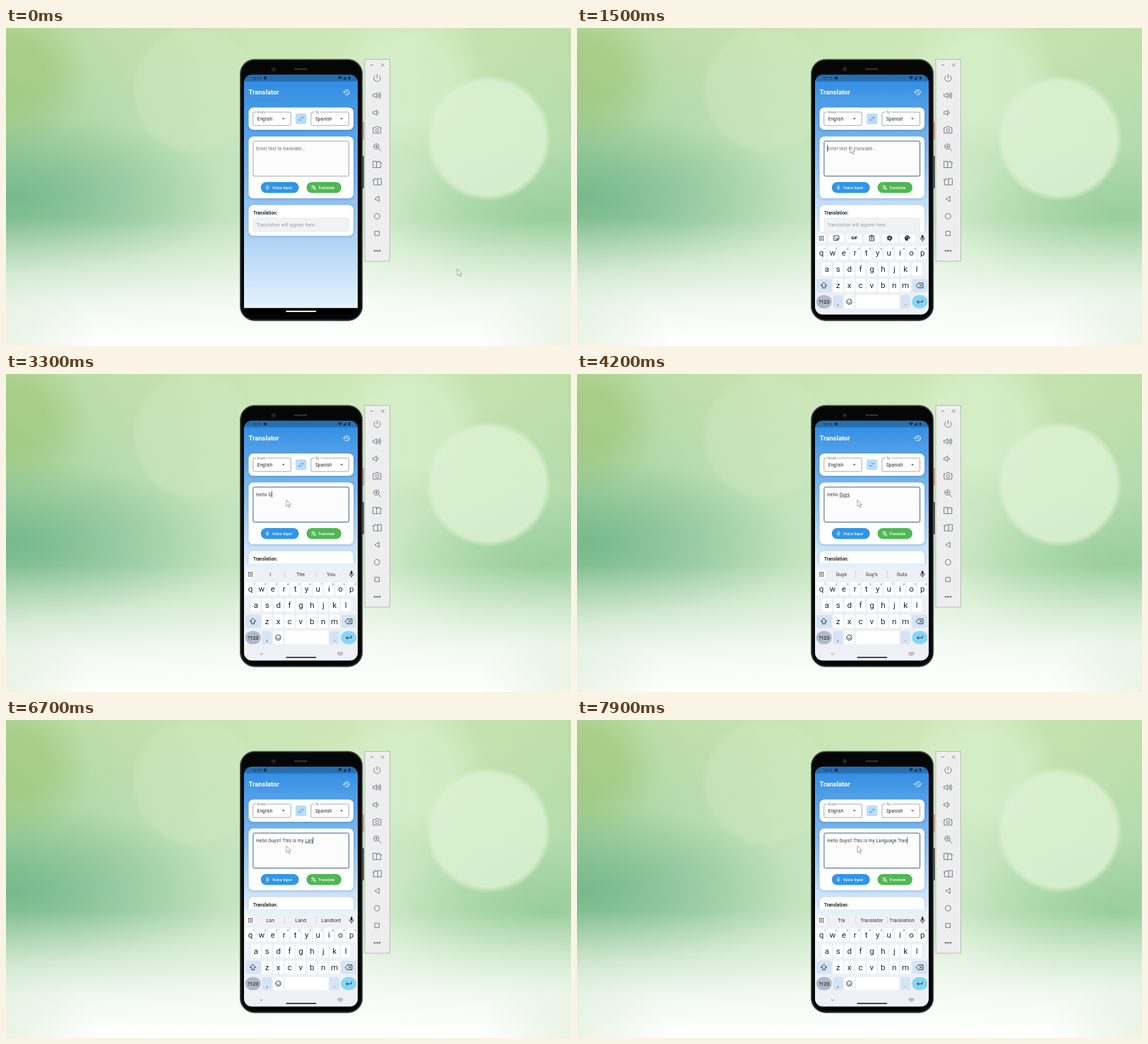
These frames come from a looping animation (800x450 px, 8 s). An HTML page:

```html
<!DOCTYPE html>
<html lang="en">
<head>
<meta charset="utf-8">
<title>Translator demo</title>
<style>
html, body { margin: 0; width: 100%; height: 100%; overflow: hidden; }
body {
  background:
    radial-gradient(ellipse 130px 90px at 0 440px, rgba(205,228,192,.4), transparent),
    radial-gradient(ellipse 130px 90px at 800px 440px, rgba(205,228,192,.4), transparent),
    linear-gradient(transparent 60%, rgba(255,255,255,.42) 73%, rgba(255,255,255,.8) 86%, #fdfefd 97%),
    radial-gradient(circle 89px at 683px 156px, rgba(220,241,210,.85) 90%, transparent),
    radial-gradient(circle 110px at 575px 72px, rgba(222,243,213,.5) 50%, transparent),
    radial-gradient(circle 105px at 15px 66px, rgba(150,190,100,.4) 40%, transparent),
    radial-gradient(circle 92px at 268px 88px, rgba(210,234,196,.35) 90%, transparent),
    radial-gradient(ellipse 300px 120px at 15px 240px, rgba(92,172,128,.6), transparent),
    radial-gradient(ellipse 230px 105px at 765px 270px, rgba(125,192,135,.5), transparent),
    linear-gradient(rgba(205,229,165,.5), transparent 45%),
    linear-gradient(90deg, #9fce9d, #b2d9b0 20%, #c6e5c0 42%, #d0eaca 64%, #bbe0b5 83%, #b2daae);
}
svg { display: block; width: 800px; height: 450px; }
text { font-family: Roboto, sans-serif; white-space: pre; }
.body { font-size: 6.27px; letter-spacing: .2px; }
.mid { text-anchor: middle; }
.card { fill: #fff; filter: drop-shadow(0 1.5px 2px rgba(10,60,120,.24)); }
.line { fill: none; stroke-linecap: round; stroke-linejoin: round; }
</style>
</head>
<body>
<svg viewBox="0 0 800 450" xmlns="http://www.w3.org/2000/svg">
  <defs>
    <linearGradient id="sky" x1="0" y1="0" x2="0" y2="1">
      <stop stop-color="#2b8ae2"/><stop offset="1" stop-color="#e6f2fd"/>
    </linearGradient>
    <clipPath id="screen"><rect x="337" y="66" width="161" height="339.5" rx="11"/></clipPath>
    <clipPath id="view"><rect id="viewBox" x="337" y="66" width="161" height="331"/></clipPath>
  </defs>

  <g id="phone">
    <rect x="503.500" y="133" width="3" height="25" rx="1" fill="#cf8168"/>
    <rect x="503.500" y="181" width="3" height="46" rx="1" fill="#1b1d1e"/>
    <rect x="331.600" y="44.400" width="173" height="369.800" rx="20.500" fill="#050606" stroke="#5d6264" stroke-width="1.200"/>
    <rect x="333" y="45.800" width="170.200" height="367" rx="19" fill="none" stroke="#232627" stroke-width=".9"/>
    <circle cx="379" cy="58.3" r="3.6" fill="#17191d"/><circle cx="379" cy="58.3" r="1.5" fill="#2c3140"/>
    <rect x="408" y="57" width="19" height="2.6" rx="1.3" fill="#2b2d2f"/>
  </g>

  <g clip-path="url(#screen)">
    <rect id="bg" x="337" y="66" width="161" height="330.5" fill="url(#sky)"/>
    <rect x="337" y="66" width="161" height="9.5" fill="#000" opacity=".22"/>
    <rect x="337" y="396.500" width="161" height="9.500" fill="#000"/>
    <g fill="#12324f">
      <text x="348.5" y="72.8" font-size="5">12:15</text>
      <circle cx="367" cy="70.8" r="2.2"/>
      <path d="M470 69.4q3-2.4 6 0l-3 3.6zM481.500 68.300v4.700h-4.700zM484.800 68.600h2.600v4.400h-2.600z"/>
    </g>
    <text x="343.5" y="94.2" font-size="9.4" font-weight="700" fill="#fff">Translator</text>
    <g class="line" stroke="#fff" stroke-width=".9">
      <path d="M478.900 91a3.700 3.700 0 1 1 1.200 2.700M482.700 89v2.200l1.600 1"/>
      <path d="M477.300 90.400l1.600 1.700 1.700-1.700" fill="#fff" stroke-width=".5"/>
    </g>
    <g clip-path="url(#view)">
      <rect class="card" x="343.500" y="112.500" width="148.500" height="31.500" rx="6.500"/>
      <g id="langs"></g>
      <rect x="410" y="120.800" width="15.500" height="15.300" rx="3.200" fill="#b9ddfa"/>
      <path class="line" stroke="#2f82cf" stroke-width=".65" d="M417 126.900h4m-1-1l1 1-1 1M418.500 130.100h-4m1-1l-1 1 1 1"/>

      <rect class="card" x="343.500" y="153.500" width="148.500" height="87.500" rx="6.500"/>
      <rect id="field" x="349.900" y="160" width="135.700" height="49.600" rx="1.800" fill="#fcfcfd"/>
      <text id="typed" class="body" x="354.300" y="172.700"><tspan id="done"></tspan><tspan id="word"></tspan></text>
      <rect id="caret" y="166" width=".8" height="9" fill="#26384f"/>
      <rect x="360.800" y="218" width="53.800" height="15.600" rx="7.800" fill="#2f95e9"/>
      <rect x="425.500" y="218" width="49.400" height="15.600" rx="7.800" fill="#4fb753"/>
      <g fill="#fff" font-size="5.490" font-weight="500" letter-spacing=".04">
        <text x="377" y="227.700">Voice Input</text>
        <text x="441.900" y="227.700">Translate</text>
      </g>
      <g class="line" stroke="#fff" stroke-width=".65">
        <rect x="369.300" y="222.800" width="1.800" height="3.700" rx=".9"/>
        <path d="M368.100 225.500q0 2.300 2.100 2.300t2.100-2.300M370.200 227.800v1.200"/>
        <path d="M432.300 223.700h4.400M434.500 222.800v.9M436 223.700q-.8 2.500-3.600 4.200M433.300 224.500q.8 1.800 2.500 2.700M435.600 229l1.600-4.200 1.600 4.200M436.200 227.800h2"/>
      </g>

      <rect class="card" x="343.500" y="250.500" width="148.500" height="43.500" rx="6.500"/>
      <text x="349.900" y="263.600" font-size="6.270" font-weight="700" letter-spacing=".08" fill="#25282b">Translation:</text>
      <rect x="349.900" y="269" width="135.700" height="19" rx="2.500" fill="#f1f2f4" stroke="#dcdfe2" stroke-width=".5"/>
      <text class="body" x="354.600" y="280.700" fill="#9b9da0">Translation will appear here...</text>
    </g>
    <rect x="396.300" y="400" width="43" height="1.900" rx=".9" fill="#fff"/>
    <g id="board">
      <rect x="337" y="274" width="161" height="132" fill="#eef0f6"/>
      <g id="tools"></g>
      <g id="tips" font-size="7.100" fill="#33373b" class="mid">
        <path d="M394.500 278v10M439.500 278v10" stroke="#c6cad0" stroke-width=".6"/>
        <text x="374.300" y="285.700"></text><text x="417.200" y="285.700"></text><text x="460.200" y="285.700"></text>
      </g>
      <g id="keys"></g>
    </g>
  </g>

  <g id="panel"></g>
  <path id="mouse" d="M0 0v9.500l2.200-2 1.600 3.300 1.300-.6-1.500-3.300h3z" fill="#fff" fill-opacity=".85" stroke="#7d8184" stroke-width=".7"/>
</svg>
<script>
const $ = id => document.getElementById(id);
const rect = (x, y, w, h, r, fill) =>
  `<rect x="${x}" y="${y}" width="${w}" height="${h}" rx="${r}" fill="${fill}"/>`;
const label = (s, x, y, size, fill = '#24272a', extra = '') =>
  `<text class="mid" x="${x}" y="${y}" font-size="${size}" fill="${fill}" ${extra}>${s}</text>`;
// Icon drawn around 0,0 and moved into place
const icon = (d, x, y, color = '#2b2f33', w = 0.9, fill = 'none') =>
  `<path class="line" transform="translate(${x} ${y})" d="${d}" stroke="${color}" stroke-width="${w}" style="fill:${fill}"/>`;
const ring = (r, x = 0, y = 0) => `M${x - r} ${y}a${r} ${r} 0 1 0 ${2 * r} 0a${r} ${r} 0 1 0 ${-2 * r} 0`;

function langBox(x, name, lang) {
  return `<rect x="${x}" y="119" width="53.600" height="19" rx="2" fill="none" stroke="#777c82" stroke-width=".65"/>` +
    rect(x + 5, 117.5, name.length * 2.6 + 3, 3, 0, '#fff') +
    `<text x="${x + 6}" y="120.700" font-size="4.700" letter-spacing=".15" fill="#60656a">${name}</text>` +
    `<text class="body" x="${x + 6}" y="130.700" fill="#202326">${lang}</text>` +
    `<path d="M${x + 41} 127.400h4.200l-2.100 2.200z" fill="#4b5055"/>`;
}
$('langs').innerHTML = langBox(349.7, 'From', 'English') + langBox(431.9, 'To', 'Spanish');

function keys() {
  const PALE = '#d3e4f5';
  const rows = [['qwertyuiop', 346, 304], ['asdfghjkl', 353.8, 327], ['zxcvbnm', 369.6, 350]];
  let out = '';
  rows.forEach(([letters, x0, y], row) => [...letters].forEach((c, i) => {
    const x = x0 + i * 15.93;
    out += rect(x - 6.8, y - 9.3, 13.6, 18.6, 2.6, '#fff') + label(c, x, y + 3.8, 11.6);
    if (!row) out += label((i + 1) % 10, x + 5.1, y - 4.6, 4.4, '#5d6266');
  }));
  out += rect(339.2, 340.7, 21.6, 18.6, 2.6, PALE) + rect(474.600, 340.7, 21.6, 18.6, 2.6, PALE);
  out += icon('M0-4L4 0H1.900V3.600H-1.900V0H-4z', 349.7, 350);
  out += icon('M-4.800 0L-2-3.400H4.600V3.400H-2zM-.2-1.500L2.800 1.500M2.800-1.500L-.2 1.500', 485.3, 350);
  out += rect(338.8, 363.7, 22, 18.6, 9.3, '#aebac8') + label('?123', 349.8, 375.6, 7, '#24272a', 'font-weight="500"');
  out += rect(362.800, 363.7, 13.600, 18.6, 2.6, PALE) + label(',', 369.600, 377.5, 9);
  out += rect(378.700, 363.7, 13.600, 18.6, 2.6, '#fff');
  out += icon(ring(3.7) + 'M-1.400-1v.1M1.400-1v.1M-1.800 1q1.800 2 3.600 0', 385.500, 373);
  out += rect(394.700, 363.7, 61.500, 18.6, 2.6, '#fff');
  out += rect(458.400, 363.7, 13.600, 18.6, 2.6, PALE) + label('.', 465.200, 377.5, 9);
  out += rect(474.300, 363.7, 22, 18.6, 9.3, '#86d6f8');
  out += icon('M3.800-2.400V.6H-3.600M-1.500-1.500L-3.600.6-1.500 2.700', 485.300, 372.8);
  out += icon('M-1.700-.7L0 1 1.700-.7', 361.800, 396.300, '#70757a', 0.8);
  out += icon('M-3-2H3V1H-3zM-1.800-.7H1.800M-.8 2.600H.8', 473.500, 396, '#70757a', 0.6);
  out += rect(396.300, 400.200, 43, 1.8, 0.9, '#303337');
  // Launcher grid and microphone stay in both toolbars
  out += rect(340.300, 277.300, 11.600, 11.600, 3, '#fff');
  for (let i = 0; i < 9; i++) out += rect(342.800 + i % 3 * 2.5, 279.9 + (i / 3 | 0) * 2.5, 1.5, 1.5, 0.2, '#33373b');
  out += rect(487.800, 278.600, 2.8, 5.400, 1.4, '#2b2f33');
  return out + icon('M-3-.8Q-3 2.200 0 2.200T3-.8M0 2.200V4.100', 489.200, 283.5, '#2b2f33', 0.85);
}
$('keys').innerHTML = keys();

function tools() {
  const xs = [367.500, 392.500, 417.500, 442.600, 467.700];
  const y = 283;
  return xs.map(x => rect(x - 10.8, 277.300, 21.6, 11.600, 3, '#fff')).join('') +
    icon('M-3.400-3.400H3.400V1L1 3.400H-3.400zM3.400 1H1V3.400M-1.500-1v.1M1.500-1v.1M-1.500.8Q-.5 1.800.5 1', xs[0], y) +
    label('GIF', xs[1], y + 2.1, 6, '#24272a', 'font-weight="900"') +
    icon('M-3-3H3V3.800H-3zM-1.200-3.900H1.200V-2.400H-1.200zM-1.400-.4H1.400M-1.400 1.500H.8', xs[2], y) +
    icon(ring(2.1), xs[3], y, '#2b2f33', 1.8) +
    `<circle cx="${xs[3]}" cy="${y}" r="3.400" fill="none" stroke="#2b2f33" stroke-width="1.300" stroke-dasharray="1.780 1.780"/>` +
    icon('M0-3.600a3.600 3.600 0 1 0 0 7.200q1-.2.500-1.300t.6-1.300H2.300q1.400-.3 1.300-1.700Q3-3.500 0-3.600z', xs[4], y, '#2b2f33', 0.6, '#2b2f33') +
    icon('M-2-.4v.1M-.9-2v.1M1-2v.1M2.200-.5v.1', xs[4], y, '#fff', 1.1);
}
$('tools').innerHTML = tools();

function panel() {
  const x = 525.5, c = '#66737a';
  const speaker = 'M-5.500-1.500H-3.600L-.8-3.800V3.800L-3.600 1.500H-5.500z';
  const turn = 'M-5.500-4.500H-.8V4.500H-5.500zM-.8-3.500H2M-.8 4.500H5.200V0M2-4.800Q5.300-4.500 5.300-1.500M3.900-2.500L5.300-1.200 6.500-2.600';
  const shapes = [
    'M0-5.200V0M-3-3.700A4.700 4.700 0 1 0 3-3.700',
    speaker + 'M1-1.800Q2.300 0 1 1.800M2.400-3.200Q4.500 0 2.400 3.200M3.800-4.300Q6.800 0 3.800 4.300',
    speaker + 'M1.200-1.900Q2.700 0 1.200 1.900',
    'M-5.300-3.300H-2.500L-1.500-4.800H1.500L2.500-3.300H5.300V4.500H-5.300z' + ring(2.2, 0, 0.4),
    ring(3.7, -1, -1) + 'M1.700 1.700L5.300 5.300M-2.800-1H.8M-1-2.800V.8',
    turn, turn,
    'M2.800-3.500V3.500L-3.200 0z', ring(3.9), 'M-3-3H3V3H-3z'
  ];
  let out = `<rect x="508" y="44.500" width="35.500" height="285.500" fill="#eeeeee" stroke="#a9b3a9" stroke-width=".8"/>`;
  out += icon('M-1.800 0H1.800', 518, 52.500, '#666', 0.7) + icon('M-1.900-1.900L1.900 1.900M1.900-1.900L-1.900 1.900', 533.300, 52.500, '#666', 0.7);
  shapes.forEach((d, i) => {
    const pic = icon(d, 0, 0, c, 0.9);
    out += `<g transform="translate(${x} ${71 + i * 24.42})${i === 6 ? ' scale(-1 1)' : ''}">${pic}</g>`;
  });
  for (const dx of [-3.500, 0, 3.500]) out += `<circle cx="${x + dx}" cy="315.300" r="1.250" fill="${c}"/>`;
  return out;
}
$('panel').innerHTML = panel();

// Typing bursts: text, first key time, gap between keys
const strokes = [['H', 2400, 0], ['ello Guys', 2700, 120], ['!! ', 4500, 140], ['Th', 5060, 160],
  ['is is my ', 5400, 95], ['Lan', 6260, 120], ['guage ', 6760, 115], ['Tran', 7460, 133]]
  .flatMap(([s, start, gap]) => [...s].map((c, i) => ({ c, at: start + i * gap })));

const nextWords = {
  '': 'I The You', H: 'Hey How', He: 'Hey Her', Hel: 'Help Hello', Hell: 'Hello Hells', Hello: "Hellos Hello's",
  G: 'Good Go', Gu: 'Guys Guy', Guy: 'Guys Guy\'s', Guys: "Guy's Guts", T: 'The To', Th: "The That's", Thi: 'This Think',
  This: 'Thus Think', i: 'is in', is: "isn't it", m: 'my me', my: 'myself may', L: 'Love Let', La: 'Last Later',
  Lan: 'Land Landlord', Lang: 'Language Lange', Langu: 'Language Languages', Langua: 'Language Languages',
  Languag: 'Language Languages', Language: 'Languages Languaged', Tr: 'Try True', Tra: 'Translator Translation'
};

const textAt = t => strokes.filter(k => k.at <= t).map(k => k.c).join('');
const lastWord = s => s.match(/[A-Za-z]*$/)[0];
const clamp = v => Math.min(1, Math.max(0, v));
const ease = v => v * v * (3 - 2 * v);

function mouseAt(t) {
  const a = ease(clamp(t / 950)), b = ease(clamp((t - 900) / 200)), c = ease(clamp((t - 1500) / 500));
  return [639 - 252 * a + 10 * c, 341 - 159 * a - 14 * b + 10 * c];
}

function draw(t) {
  const focus = t >= 1300, open = t >= 1600;
  $('mouse').setAttribute('transform', `translate(${mouseAt(t)})`);

  // The page background shrinks to end where the keyboard begins
  const drop = 132 * (1 - clamp((t - 1200) / 400)) ** 1.6;
  $('board').setAttribute('transform', `translate(0 ${drop})`);
  $('bg').setAttribute('height', Math.min(330.5, 209 + drop));
  $('viewBox').setAttribute('height', open ? 202 : 331);
  $('field').setAttribute('stroke', focus ? '#3f5f94' : '#777c82');
  $('field').setAttribute('stroke-width', focus ? 1 : 0.65);

  const text = textAt(t);
  const word = lastWord(text);
  const settled = text === textAt(t - 120);
  $('done').textContent = text ? text.slice(0, text.length - word.length) : 'Enter text to translate...';
  $('word').textContent = word;
  $('word').setAttribute('text-decoration', settled ? 'underline' : 'none');
  $('typed').setAttribute('fill', text ? '#35393d' : '#65696e');

  const lastKey = strokes.filter(k => k.at <= t).pop();
  const since = t - (lastKey ? lastKey.at : 1300);
  $('caret').setAttribute('x', 354.3 + (text ? $('typed').getComputedTextLength() : 0));
  $('caret').style.display = focus && since % 1000 < 500 ? '' : 'none';

  const seen = textAt(t - 60);
  const prefix = lastWord(seen);
  $('tools').style.display = seen ? 'none' : '';
  $('tips').style.display = seen ? '' : 'none';
  const words = (nextWords[prefix] || '').split(' ');
  if (prefix) words.unshift(prefix);
  $('tips').querySelectorAll('text').forEach((el, i) => { el.textContent = words[i] || ''; });
}

function tick() {
  draw(Math.floor(performance.now() % 8000 / 100) * 100);
  requestAnimationFrame(tick);
}
tick();
</script>
</body>
</html>
```
